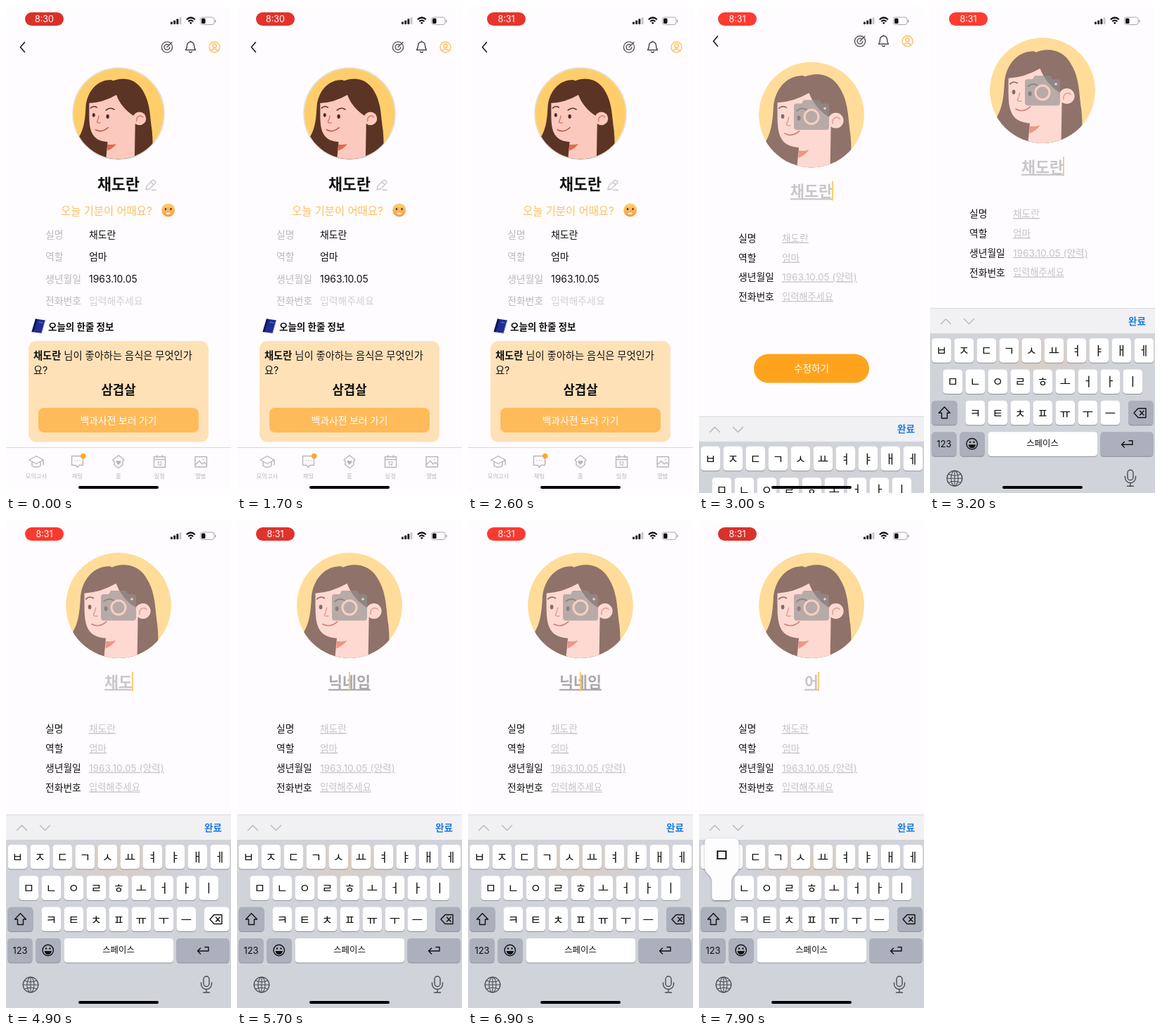
Recreate the animation shown at these times as an HTML page. Size 320x692 px, loop 8 s.

```html
<!DOCTYPE html>
<html lang="ko">
<head>
<meta charset="utf-8">
<title>프로필 수정</title>
<style>
html, body { margin: 0; width: 100%; height: 100%; overflow: hidden; background: #fefcfe; }
svg { display: block; width: 100vw; height: 100vh; }
text { font-family: Inter, "Noto Sans CJK KR", "Noto Sans CJK", sans-serif; }
.u { text-decoration: underline; text-decoration-skip-ink: none; }
.line { fill: none; stroke-linecap: round; stroke-linejoin: round; }
</style>
</head>
<body>
<svg id="stage" viewBox="0 0 320 692"></svg>
<script>
const LOOP = 8000, NAME = '채도란', ORANGE = '#ffbf60';
const EDIT_AT = 2800, MINUTE_AT = 2300;

// Markup helpers; text is placed by its vertical centre.
const text = (x, cy, size, str, fill = '#111', extra = '') =>
  `<text x="${x}" y="${cy + size * .38}" font-size="${size}" fill="${fill}" ${extra}>${str}</text>`;
const MID = 'text-anchor="middle"', BOLD = 'font-weight="700"';
const rect = (x, y, w, h, r, fill, extra = '') =>
  `<rect x="${x}" y="${y}" width="${w}" height="${h}" rx="${r}" fill="${fill}" ${extra}/>`;
const circle = (x, y, r, fill, extra = '') => `<circle cx="${x}" cy="${y}" r="${r}" fill="${fill}" ${extra}/>`;
const ellipse = (x, y, rx, ry, fill, extra = '') =>
  `<ellipse cx="${x}" cy="${y}" rx="${rx}" ry="${ry}" fill="${fill}" ${extra}/>`;
const line = (d, color, width = 1.3, extra = '') =>
  `<path class="line" d="${d}" stroke="${color}" stroke-width="${width}" ${extra}/>`;
const shape = (d, fill, extra = '') => `<path d="${d}" fill="${fill}" ${extra}/>`;
const ring = (x, y, r, color, width = 1.3) => circle(x, y, r, 'none', `stroke="${color}" stroke-width="${width}"`);
const group = (id, body, extra = '') => `<g id="${id}" ${extra}>${body}</g>`;

const portrait = (cx, cy, r) => `<g transform="translate(${cx} ${cy}) scale(${r / 65})">
  <g clip-path="url(#round)">
    ${circle(0, 0, 65, '#ffce6b')}
    ${shape('M-62 40C-50 28-48 10-47-8C-46-30-32-47-14-48Q-10-49-8-47C6-53 26-51 36-31C46-14 45 6 48 24Q50 45 48 66H-62Z', '#5c3425')}
    ${shape('M-15 34L-18 66H23L24 10Z', '#fcc9be')}
    ${shape('M-16 44Q-9 45-3 43Q-8 50-16 53Z', '#e2694c')}
    ${shape('M-42-15Q-22-16-3-27C1-16 10-3 24 4V14L11 31C0 42-20 43-31 36C-41 29-42 16-42 0Z', '#fcc9be')}
    ${circle(30, 7, 9.5, '#fcc9be')}
    ${line('M26 11C25 4 31 1 35 5', '#d97a68', 1.4)}
    ${ellipse(-35.5, 2, 2, 2.8, '#4b2a22')}
    ${ellipse(-15.5, 4, 2.2, 3, '#4b2a22')}
    ${line('M-40-8Q-36-12-31-9M-18-5Q-12-10-6-6', '#5c3425', 1.6)}
    ${line('M-28 3Q-29 8-31 12Q-29 14-26 13', '#cf6d5c', 1.2)}
    ${line('M-33 23Q-24 28-15 20', '#b8483e', 1.4)}
  </g></g>`;

const header = line('M26.500 51.500L20.500 58.500L26.500 65.500', '#111', 1.5)
  + ring(229, 58.5, 7.6, '#555', 1.4)
  + line('M231.500 55.500A3.900 3.900 0 1 0 232.800 58.500M229 58.500L236 51.500', '#555', 1.4)
  + line('M255.500 62.500Q257.500 60 257.500 56A5 5 0 0 1 267.500 56Q267.500 60 269.500 62.500ZM260.500 65Q262.500 67 264.500 65M262.500 50V51', '#444', 1.4)
  + ring(296.5, 58.5, 7.5, ORANGE, 1.4) + ring(296.5, 56.5, 2.7, ORANGE, 1.4)
  + line('M291.500 64Q296.500 58 301.500 64', ORANGE, 1.4);

const status = rect(27, 9, 55, 19, 9.5, '#d8312b', 'id="pill"')
  + text(54.5, 18.5, 12.5, '8:30', '#fff', `id="clock" ${MID}`)
  + [0, 1, 2, 3].map(i => rect(234 + i * 4.2, 22.5 - i * 2.1, 2.9, 3.5 + i * 2.1, .8, i < 3 ? '#111' : '#c6c4c6')).join('')
  + line('M256.800 19.200Q262.800 13.800 268.800 19.200', '#111', 2.2, 'style="stroke-linecap:butt"')
  + line('M259.200 22Q262.800 18.800 266.400 22', '#111', 2, 'style="stroke-linecap:butt"')
  + shape('M260.800 23.800Q262.800 22.200 264.800 23.800L262.800 26Z', '#111')
  + rect(276.5, 16, 19.5, 10.5, 3, 'none', 'stroke="#a9a7a9"')
  + rect(278, 17.5, 5.5, 7.5, 1.5, '#111') + rect(297, 19.5, 1.5, 4, .8, '#a9a7a9');

const GREY = '#b7b5b7';
const tabIcons = [
  'M33 645L43 639.500L53 645L43 650.500ZM37 648V653.500Q43 657 49 653.500V648M53 645V652',
  'M93.500 639.500H109.500V652.500H104L101.500 655.500L99 652.500H93.500ZM98 646H98.100M101.500 646H101.600M105 646H105.100',
  'M152 645L160 638.500L168 645L166 647V652L160 656.500L154 652V647Z',
  'M210.500 640.500H226.500V655.500H210.500ZM210.500 644.500H226.500M214.500 638.500V641.500M222.500 638.500V641.500',
  'M269 640.500H285.500V655H269ZM269 652L275 646.500L279 651L282 648.500L285.500 652M280.500 644.500H281'
];
const tabs = rect(0, 627, 320, 1, 0, '#d9d7d9')
  + tabIcons.map(d => line(d, GREY, 1.4)).join('')
  + shape('M160 652L156.500 648.500Q156 645 160 646.500Q164 645 163.500 648.500Z', GREY)
  + text(218.5, 650.3, 7, '12', GREY, `${MID} ${BOLD}`) + circle(109.7, 639.5, 3.7, '#ffa629')
  + ['모의고사', '채팅', '홈', '일정', '앨범'].map((s, i) => text(43 + i * 58.4, 667.5, 8.3, s, GREY, MID)).join('');

const rows = ['실명', '역할', '생년월일', '전화번호'];
const values = [NAME, '엄마', '1963.10.05', '입력해주세요'];

const emoji = circle(230.7, 290, 9.5, 'url(#face)')
  + ellipse(227, 288.5, 1.2, 1.8, '#5b3210') + ellipse(234.5, 288.5, 1.2, 1.8, '#5b3210')
  + ellipse(230.7, 294.7, 3.2, 1.5, '#ffeed8');
const book = shape('M42 444.500L56 446.500L51 465L36.500 463Z', '#1f2c92')
  + shape('M42 444.500L45 445L39.500 463.500L36.500 463Z', '#10185a')
  + line('M37 463.800L50.500 465.500L55.500 448', '#cfd3e6', .9) + line('M47 449.500L52 450.200', '#6f7fd0', 1);

const profile = header + ring(160, 153, 65, '#dedede', 1.5) + portrait(160, 153, 64.5)
  + text(160, 253, 21.7, NAME, '#111', `${MID} ${BOLD}`)
  + line('M199 261L200 256L208 248Q209.500 246.500 211 248L212 249Q213.500 250.500 212 252L204 260ZM206 250L210 254M207 261.500H213.500', '#c6c4c6', 1.3)
  + text(78, 291, 15.4, '오늘 기분이 어때요?', ORANGE)
  + emoji
  + rows.map((s, i) => text(56, 324.5 + i * 31.5, 13.9, s, '#bab8ba')
    + text(118, 324.5 + i * 31.5, 13.9, values[i], i < 3 ? '#111' : '#d2d0d2')).join('')
  + book
  + text(60, 455.5, 13.5, '오늘의 한줄 정보', '#111', BOLD)
  + rect(32, 476, 256, 143.5, 11, '#ffe1b8')
  + text(39, 497, 14.25, `<tspan ${BOLD}>${NAME}</tspan> 님이 좋아하는 음식은 무엇인가`) + text(39, 517.5, 14.25, '요?')
  + text(160, 545, 17.8, '삼겹살', '#111', `${MID} ${BOLD}`)
  + rect(46, 571, 228, 35, 8, '#ffba59') + text(160, 588.5, 13.8, '백과사전 보러 가기', '#fff', `${MID} font-weight="500"`)
  + tabs;

const camera = shape('M139 147H146L149 142H171L174 147H181Q185 147 185 151V180Q185 184.500 181 184.500H139Q135 184.500 135 180V151Q135 147 139 147Z', '#929090', 'opacity=".64"')
  + ring(160, 166, 10, '#f6cfc3', 3) + circle(179, 154, 1.8, '#e8d5cd');

const editPage = header + portrait(160, 163, 75) + circle(160, 163, 75.3, '#fefcfe', 'opacity=".31"') + camera
  + text(160, 271.5, 21.7, NAME, '#c8c6c8', `id="nick" class="u" ${MID} ${BOLD}`)
  + rect(189, 257, 1.8, 28, .9, '#ffc567', 'id="caret"')
  + rows.map((s, i) => text(56, 338 + i * 27.8, 13.8, s, '#111', 'font-weight="500"')
    + text(118, 338 + i * 27.8, i < 3 ? 13.7 : 13.2, values[i] + (i === 2 ? ' (양력)' : ''), '#c6c4c6', 'class="u"')).join('')
  + rect(78, 503, 164, 41, 20.5, '#ffa31d') + text(160, 523.5, 13.6, '수정하기', '#fff', `${MID} font-weight="500"`);

// Keyboard, drawn at its resting place.
const key = (x, y, w, fill = '#fff', id = '') =>
  rect(x, y + 1, w, 34.5, 4.5, '#8d9097') + rect(x, y, w, 34.5, 4.5, fill, id && `id="${id}"`);
const DARK = '#abb0bc';
const letters = {};
const letterRow = (chars, x0, y) => [...chars].map((c, i) => {
  const x = x0 + i * 32;
  letters[c] = { x, y };
  return key(x, y, 27.5) + text(x + 13.75, y + 17.5, 17, c, '#111', MID);
}).join('');

const keyboard = rect(0, 417, 320, 36.5, 0, '#f1f0f3') + rect(0, 417, 320, .7, 0, '#d2d1d5')
  + rect(0, 453, 320, 240, 0, '#d1d3da')
  + rect(60, 453, 200, 62, 0, 'url(#warm)', 'id="glow"')
  + line('M15.500 439.500L22.500 432.500L29.500 439.500M48.500 432.500L55.500 439.500L62.500 432.500', '#bcbcc1', 1.5)
  + text(282, 435.5, 13.5, '완료', '#157be3', BOLD)
  + letterRow('ㅂㅈㄷㄱㅅㅛㅕㅑㅐㅔ', 2.5, 460)
  + letterRow('ㅁㄴㅇㄹㅎㅗㅓㅏㅣ', 18.5, 504.3)
  + letterRow('ㅋㅌㅊㅍㅠㅜㅡ', 50.5, 548.6)
  + key(2.5, 548.6, 36, DARK) + line('M20.500 557.500L28.500 566H24.500V573.500H16.500V566H12.500Z', '#111', 1.4)
  + key(282, 548.6, 35.5, DARK, 'delete')
  + line('M290 566L296 559.500H307V572.500H296ZM298.500 563L304 569M304 563L298.500 569', '#111', 1.4)
  + key(2.5, 593, 35, DARK) + text(20, 610.3, 13, '123', '#111', MID)
  + key(42.5, 593, 35, DARK) + ring(59.7, 610, 7.7, '#111', 1.4)
  + circle(57, 607.5, 1.2, '#111') + circle(62.5, 607.5, 1.2, '#111') + shape('M54.500 611H65Q64 616 59.700 616Q55.500 616 54.500 611Z', '#111')
  + key(82.5, 593, 155.5) + text(160, 609.5, 12.4, '스페이스', '#111', MID)
  + key(242.5, 593, 75, DARK) + line('M288 605.500V611H273M276.500 607L272.500 611L276.500 615M283 605.500H288', '#111', 1.4)
  + ring(35, 659, 10.8, '#4a4c52') + line('M35 648.200V669.800M24.200 659H45.800M26.500 653Q35 657 43.500 653M26.500 665Q35 661 43.500 665', '#4a4c52', 1.1)
  + ellipse(35, 659, 5, 10.8, 'none', 'stroke="#4a4c52" stroke-width="1.1"')
  + rect(281, 647, 8, 14.5, 4, 'none', 'stroke="#4a4c52" stroke-width="1.4"')
  + line('M277.500 656V658A7.500 7.500 0 0 0 292.500 658V656M285 665.500V670M280.500 670H289.500', '#4a4c52', 1.4);

const popup = shape('M-4-53H31.500Q38-53 38-46V-13C38-3 27.500-2 27.500 8V30Q27.500 34.500 23 34.500H4.500Q0 34.500 0 30V8C0-2-10.500-3-10.500-13V-46Q-10.500-53-4-53Z', '#fdfdfe', 'filter="url(#lift)"')
  + text(13.75, -30, 25, '', '#111', `id="popChar" ${MID}`);

document.getElementById('stage').innerHTML = `<defs>
  <clipPath id="round"><circle r="65"/></clipPath>
  <clipPath id="below"><rect y="38" width="320" height="654"/></clipPath>
  <linearGradient id="face" x2="0" y2="1"><stop stop-color="#ffd36a"/><stop offset="1" stop-color="#f2994c"/></linearGradient>
  <radialGradient id="warm"><stop stop-color="#e8c39a" stop-opacity=".5"/><stop offset="1" stop-color="#e8c39a" stop-opacity="0"/></radialGradient>
  <filter id="lift" x="-30%" y="-20%" width="160%" height="140%"><feDropShadow dx="0" dy="1" stdDeviation="1.5" flood-opacity=".3"/></filter>
  </defs>${rect(0, 0, 320, 692, 0, '#fefcfe')}`
  + group('profile', profile)
  + group('edit', `<g clip-path="url(#below)">${group('page', editPage)}</g>` + group('keys', keyboard) + group('popup', popup))
  + status + rect(103, 682, 114, 4, 2, '#000');

const el = Object.fromEntries([...document.querySelectorAll('[id]')].map(n => [n.id, n]));
const set = (id, attrs) => { for (const k in attrs) el[id].setAttribute(k, attrs[k]); };
const show = (id, on) => set(id, { display: on ? 'inline' : 'none' });
const clamp = v => Math.min(1, Math.max(0, v));
const smooth = v => { const p = clamp(v); return p * p * (3 - 2 * p); };
const mix = (a, b, p) => a.map((v, i) => Math.round(v + (b[i] - v) * p));

const edits = [[2950, NAME], [4900, NAME.slice(0, 2)], [5200, NAME[0]], [5500, ''], [7450, 'ㅇ'], [7650, '어']];
const deletes = [4900, 5200, 5500];
const presses = [[7280, 7450, 'ㅇ'], [7490, 7650, 'ㅓ'], [7800, 8000, 'ㅁ']];

function draw(t) {
  const pulse = ((1 + Math.cos((t - 3100) / 1000 * Math.PI)) / 2) ** 1.5;
  set('pill', { fill: `rgb(${mix([216, 49, 43], [255, 59, 48], pulse)})` });
  el.clock.textContent = t < MINUTE_AT ? '8:30' : '8:31';
  show('profile', t < EDIT_AT);
  show('edit', t >= EDIT_AT);

  // The keyboard follows a critically damped spring, the page an ease.
  const x = Math.max(0, (t - 2923.3) * .0176);
  const scrolled = smooth((t - 2930) / 250);
  set('keys', { transform: `translate(0 ${275 * (1 + x) * Math.exp(-x)})` });
  set('page', { transform: `translate(0 ${-43 * scrolled})` });
  set('glow', { opacity: scrolled });

  const [since, typed] = edits.filter(e => e[0] <= t).pop() || [t, NAME];
  el.nick.textContent = typed || '닉네임';
  set('nick', { fill: typed ? '#c8c6c8' : '#aaa8aa' });
  const beat = (t - since) % 1000 / 1000;
  const blink = 1 - smooth((beat - .5) / .15) + smooth((beat - .85) / .15);
  set('caret', { x: 159 + typed.length * 10, opacity: t < edits[0][0] ? 0 : blink });

  set('delete', { fill: deletes.some(d => t >= d && t < d + 130) ? '#fff' : DARK });
  const press = presses.find(p => t >= p[0] && t < p[1]);
  show('popup', press);
  if (press) {
    const { x: kx, y: ky } = letters[press[2]];
    set('popup', { transform: `translate(${kx} ${ky})` });
    el.popChar.textContent = press[2];
  }
}

const start = performance.now();
function tick() {
  draw((performance.now() - start) % LOOP);
  requestAnimationFrame(tick);
}
tick();
</script>
</body>
</html>
```
